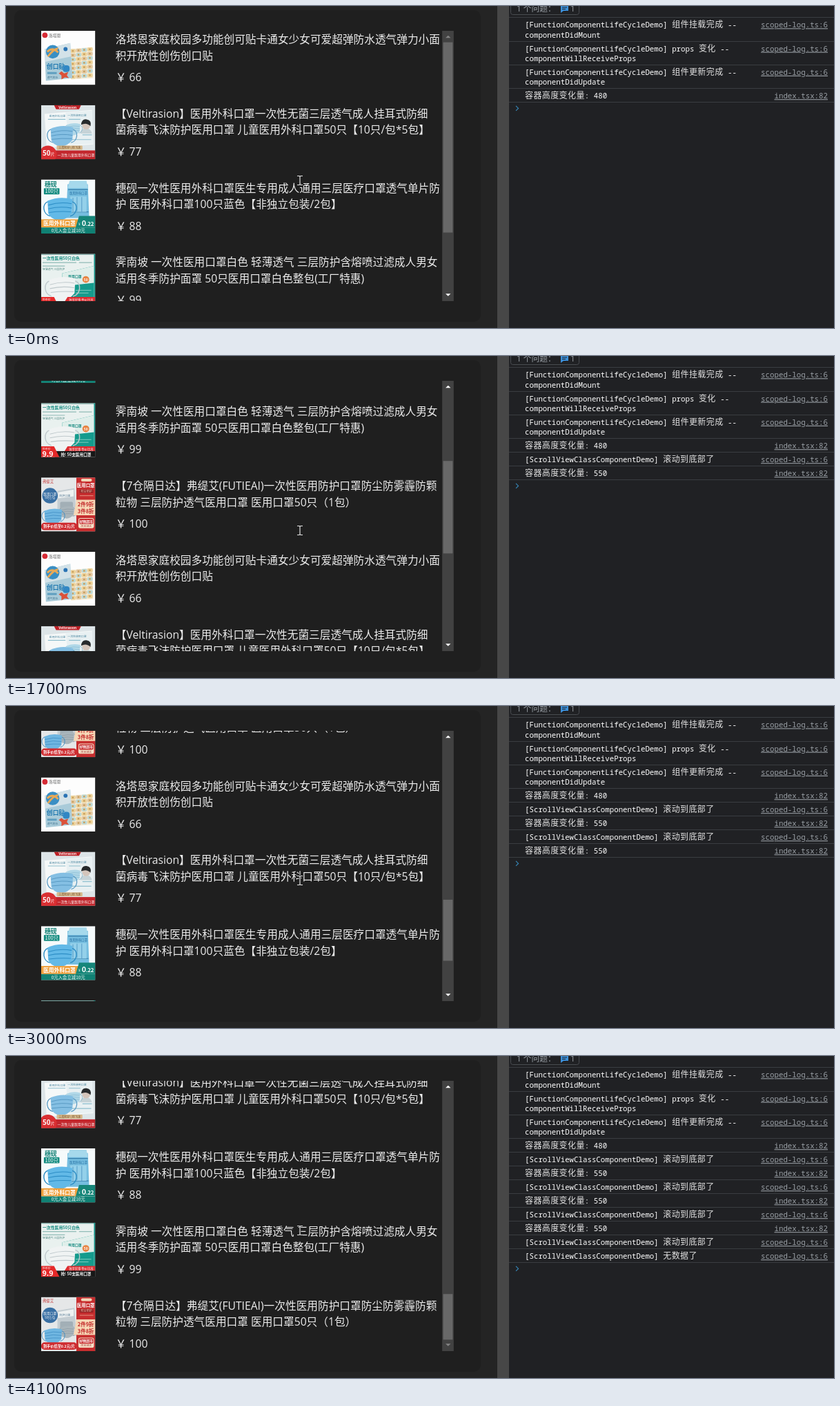
These frames come from a looping animation (1200x467 px, 6200 ms). An HTML page:

```html
<!DOCTYPE html>
<html lang="zh">
<head>
<meta charset="utf-8">
<title>Scroll view demo</title>
<style>
html, body { margin: 0; width: 100%; height: 100%; overflow: hidden; background: #242424; }
svg { display: block; width: 100%; height: 100%; }
text { white-space: pre; }
.list { font: 16px "Open Sans", "Noto Sans CJK SC", "Noto Sans CJK", sans-serif; fill: #ececec; }
.thumb { font-family: "Noto Sans CJK SC", "Noto Sans CJK", sans-serif; }
.log { font: 500 10.78px "Noto Sans Mono", "Noto Sans CJK SC", monospace; fill: #fff; }
.log .cjk { font: 400 12px "Noto Sans CJK SC", "Noto Sans CJK", sans-serif; letter-spacing: .4px; fill: #e3e3e3; }
.log .link { font-weight: 400; fill: #9aa0a6; text-decoration: underline; }
.bar { font: 11.76px "Open Sans", "Noto Sans CJK SC", sans-serif; fill: #9aa0a6; }
</style>
</head>
<body>
<svg id="stage" viewBox="0 0 1200 467" preserveAspectRatio="none"></svg>
<script>
const LOOP = 6200, SCALE = 0.98, VIEW = 400, PITCH = 110;

const rect = (x, y, w, h, fill, extra = '') =>
  `<rect x="${x}" y="${y}" width="${w}" height="${h}" fill="${fill}" ${extra}/>`;
const circle = (x, y, r, fill) => `<circle cx="${x}" cy="${y}" r="${r}" fill="${fill}"/>`;
const path = (d, fill, extra = '') => `<path d="${d}" fill="${fill}" ${extra}/>`;
const line = (d, stroke, w = 1) => path(d, 'none', `stroke="${stroke}" stroke-width="${w}"`);
const label = (x, y, size, fill, s, weight = 400, anchor = 'start') =>
  `<text x="${x}" y="${y}" font-size="${size}" fill="${fill}" font-weight="${weight}" text-anchor="${anchor}">${s}</text>`;

// Pleated face mask with ear loops, drawn in a 44 x 34 box.
const mask = (x, y, s, fill, shade) => `<g transform="translate(${x} ${y}) scale(${s})">
  ${line('M6 8C-3 10 -2 26 9 28M38 8C48 10 46 26 36 28', shade, 1.3)}
  ${path('M5 7Q22 0 39 5L38 24Q30 34 20 34Q9 32 6 24Z', fill)}
  ${line('M6 13Q22 8 38 11M6 18Q22 14 38 17M7 23Q22 21 37 22', shade, 1)}</g>`;

function plasterThumb() {
  let strips = '';
  for (let r = 0; r < 7; r++) for (let c = 0; c < 4; c++) {
    const x = 43 + c * 8.4, y = 27 + r * 6.4 - c * .8;
    strips += rect(x, y, 8, 5.6, ['#ecd29a', '#e3c9a4', '#bcd9d6'][(r + c) % 3], 'rx="2"') +
      rect(x + 2.5, y + 1.5, 2.5, 2.5, '#c99f5c');
  }
  return rect(0, 0, 80, 80, '#fdfdfd') +
    circle(5.5, 6.5, 4, '#d52b35') + label(11, 9, 6, '#666', '洛塔恩') +
    path('M42 27L76 24L77 70L44 72Z', '#f4ead3') + strips +
    path('M5 27L43 18L46 70L7 74Z', '#a9cbd9') + path('M5 27L43 18L44 38L6 46Z', '#d3e2e8') +
    circle(17, 31, 10, '#3a8fc4') + line('M9 31Q17 23 25 32M10 38Q18 27 25 26', '#e8a957', 3) +
    circle(36, 27, 3, '#2a73b4') + label(8, 56, 9, '#1f78b0', '创口贴', 700) +
    rect(32, 51, 10, 10, '#3187c4', 'rx="4"') +
    path('M30 60L34 63L40 61L38 66L41 70L35 69L30 72L30 66L26 63Z', '#db5139') +
    rect(9, 61, 14, 3, '#5f9fc0') + label(9, 70, 4, '#3c6f8c', '透气防水');
}

function kidsThumb() {
  return rect(0, 0, 80, 80, '#dde5e8') +
    path('M5 13L75 7L77 58L8 63Z', '#f5f8f8') + path('M36 11L75 8L77 57L42 59Z', '#e8f0f2') +
    path('M19 0H59L56 6H22Z', '#bd2026') + label(39, 4.8, 5, '#fff', 'Veltirasion', 600, 'middle') +
    label(12, 18, 4, '#4d87a0', '医用外科口罩') + label(39, 17, 4, '#4d87a0', '一次性使用口罩') +
    line('M10 21H36M41 21H58M44 51H74M61 44H75', '#8fbfce', 1.2) +
    path('M58 42Q58 35 66 34Q74 35 75 42Z', '#c6d3d7') + circle(66.5, 30, 6, '#d4c5bb') +
    path('M59 29Q60 20 67 21Q75 22 73 31Q67 25 59 29Z', '#272a2c') +
    mask(35, 25, .58, '#b1d8e8', '#7fb3cc') + mask(9, 28, .98, '#84bfe3', '#5698c2') +
    rect(23, 60, 38, 6, '#d6b98c', 'rx="1"') + label(42, 64.7, 4.2, '#6d4c2d', '三层防护 | 防飞沫', 400, 'middle') +
    rect(0, 67, 80, 13, '#c3272d') + circle(10, 73, 13, '#d92f32') +
    label(2, 75, 10, '#fff', '50', 700) + label(14, 75, 6, '#fff', '片') +
    label(24, 76, 5, '#fff', '一次性儿童医用外科口罩');
}

function packThumb() {
  return rect(0, 0, 80, 80, '#f5fafb') + label(5, 11, 9, '#138075', '穗砚', 700) +
    rect(4, 13, 23, 9, '#148c80', 'rx="1"') + label(15.5, 20.3, 7.5, '#fff', '100只', 500, 'middle') +
    path('M39 7H69L71 57H37Z', '#75bddf') + path('M42 2H67L69 13H39Z', '#a6d9ec') +
    line('M40 15H69M40 48H70', '#397faa', 1.2) + label(42, 22, 4.4, '#236ca0', '医用外科口罩') +
    rect(43, 25, 24, 23, '#94d0ea') + line('M47 27V47M53 26V47M60 26V48', '#559cc5', 1) +
    mask(4, 24, 1.08, '#62b9e7', '#2d8ec6') +
    rect(0, 59, 55, 12, '#efa03d') + label(3, 68, 8, '#fff', '医用外科口罩', 700) +
    path('M56 54H80V71H51Z', '#168679') + label(55, 67.5, 5, '#fff', '¥') +
    label(60, 68.5, 11, '#fff', '0', 700) + label(66, 68.5, 8, '#fff', '.22', 600) +
    rect(0, 71, 80, 9, '#108174') + label(40, 78, 6.5, '#fff', '0元入会立减10元', 500, 'middle');
}

function whiteThumb() {
  return rect(0, 0, 80, 80, '#e9f1ef') + rect(0, 0, 80, 1.5, '#7eaaa5') + rect(78, 0, 2, 72, '#15978b') +
    label(2, 9, 6, '#168b80', '一次性医用50只白色', 600) +
    line('M2 13H52M2 18H35M56 13H75', '#91bcb7', 1.2) + label(2, 24, 4, '#508a84', '轻薄透气 三层防护') +
    path('M31 29L78 18V66H30Z', '#159b8d') + path('M31 29L78 18V43L31 48Z', '#dfeeea') +
    label(40, 35, 5, '#178a80', '医用口罩', 600) + line('M51 54H74M51 58H70', '#83cec2', 1) +
    circle(66, 38, 5, '#e88342') + label(66, 40, 5, '#fff', '50', 600, 'middle') +
    mask(6, 31, 1.14, '#f0f3f3', '#bfc9cc') +
    path('M39 64H80V72H34Z', '#dc2b2f') + label(41, 70, 4.4, '#fff', '独享优惠 性价比高') +
    rect(20, 71, 60, 9, '#171717') + path('M0 64H19L27 80H0Z', '#e52828') +
    label(2, 69, 4, '#fff', '秒杀价') + label(1.5, 79, 11, '#fff', '9.9', 700) +
    label(29, 78, 5.8, '#fff', '抢! 50支医用口罩', 700);
}

function dustThumb() {
  return rect(0, 0, 80, 80, '#e5e7e8') + rect(52, 0, 28, 80, '#c72e2f') +
    label(2, 8, 5.5, '#c54040', '弗缇艾', 500) + rect(59, 2, 16, 4, '#f0d7ba', 'rx="2"') +
    label(66, 14.5, 6.6, '#fff', '医用口罩', 700, 'middle') +
    rect(57, 18, 20, 5, '#942022') + label(67, 22, 4.2, '#f2d9c0', '防尘防护', 400, 'middle') +
    line('M57 27H77', '#e49482', 1) +
    path('M24 20L49 16L52 57L24 60Z', '#c4cdd2') + path('M25 22L48 18V28L25 31Z', '#eef1f1') +
    rect(28, 36, 19, 16, '#a2afb6', 'rx="2"') + label(27, 28, 4, '#557a94', '防护口罩') +
    circle(13, 27, 11.5, '#396fa3') + label(13, 26, 4.8, '#fff', '医用口罩', 500, 'middle') +
    label(13, 32, 4.4, '#fff', '50只/包', 400, 'middle') +
    mask(26, 41, .58, '#a9b5bb', '#85949c') + mask(1, 44, .76, '#6fb6e1', '#3d8cc2') +
    path('M52 33H80V56H48Z', '#f6d7b6') + label(66, 43, 7.6, '#c22426', '2件9折', 700, 'middle') +
    label(66, 53, 7.6, '#c22426', '3件8折', 700, 'middle') +
    rect(55, 60, 23, 15, '#f5dfc6', 'rx="3"') + rect(56, 61, 21, 8, '#c72a2c', 'rx="2"') +
    label(66.5, 67, 5, '#fff', '好物超市', 600, 'middle') + label(66.5, 73.3, 4, '#a63030', '次日送达', 400, 'middle') +
    rect(0, 67, 53, 11, '#cf2c30', 'rx="5"') + label(26.5, 74.6, 5.3, '#fff', '到手价低至0.2元/片', 600, 'middle');
}

const products = [
  [plasterThumb, '洛塔恩家庭校园多功能创可贴卡通女少女可爱超弹防水透气弹力小面', '积开放性创伤创口贴', 66],
  [kidsThumb, '【Veltirasion】医用外科口罩一次性无菌三层透气成人挂耳式防细', '菌病毒飞沫防护医用口罩 儿童医用外科口罩50只【10只/包*5包】', 77],
  [packThumb, '穗砚一次性医用外科口罩医生专用成人通用三层医疗口罩透气单片防', '护 医用外科口罩100只蓝色【非独立包装/2包】', 88],
  [whiteThumb, '霁南坡 一次性医用口罩白色 轻薄透气 三层防护含熔喷过滤成人男女', '适用冬季防护面罩 50只医用口罩白色整包(工厂特惠)', 99],
  [dustThumb, '【7仓隔日达】弗缇艾(FUTIEAI)一次性医用防护口罩防尘防雾霾防颗', '粒物 三层防护透气医用口罩 医用口罩50只（1包）', 100],
];

const item = i => {
  const [, first, second, price] = products[i % 5];
  return `<g transform="translate(0 ${i * PITCH})"><use href="#thumb${i % 5}"/>
    <text x="110" y="18.4">${first}</text><text x="110" y="42.4">${second}</text>
    <text x="110" y="74.5">￥ ${price}</text></g>`;
};

// Console entries: [time, message, link, optional second line]
const hook = '[FunctionComponentLifeCycleDemo]', view = '[ScrollViewClassComponentDemo]';
const scoped = 'scoped-log.ts:6', index = 'index.tsx:82';
const reached = t => [t, view + ' 滚动到底部了', scoped];
const grown = (t, n) => [t, '容器高度变化量: ' + n, index];
const entries = [
  [0, hook + ' 组件挂载完成 --', scoped, 'componentDidMount'],
  [0, hook + ' props 变化 --', scoped, 'componentWillReceiveProps'],
  [0, hook + ' 组件更新完成 --', scoped, 'componentDidUpdate'],
  grown(0, 480),
  reached(1200), grown(1300, 550),
  reached(2400), grown(2500, 550),
  reached(3400), grown(3500, 550),
  reached(4100), [4100, view + ' 无数据了', scoped],
];

const markup = s => s.replace(/[\u4e00-\u9fff]+/g, '<tspan class="cjk">$&</tspan>');

let rowTop = 16.8;
const rowEnds = [];
const rows = entries.map(([, message, link, more]) => {
  const y = rowTop + 14.5;
  rowTop += more ? 34.3 : 20;
  rowEnds.push(rowTop);
  return `<g class="row"><text x="752" y="${y}">${markup(message)}</text>
    ${more ? `<text x="752" y="${y + 14.2}">${more}</text>` : ''}
    <text class="link" x="1191" y="${y}" text-anchor="end">${link}</text>
    ${rect(729, Math.floor(rowTop), 471, 1, '#3a3d41')}</g>`;
}).join('');

const beam = 'M422 246.5H425L426 247.5L427 246.5H430M426 247V259M422 259.5H425L426 258.5L427 259.5H430';

document.getElementById('stage').innerHTML = `
  <defs>
    <clipPath id="view">${rect(0, 0, 593, VIEW, '#000')}</clipPath>
    <clipPath id="square">${rect(0, 0, 80, 80, '#000')}</clipPath>
    ${products.map(([draw], i) => `<g id="thumb${i}" class="thumb" clip-path="url(#square)">${draw()}</g>`).join('')}
  </defs>
  ${rect(0, 0, 1200, 467, '#242424')}
  ${rect(12, 6, 676, 452, '#1f1f1f', 'rx="10"')}
  <g transform="translate(51 36) scale(${SCALE})">
    <g class="list" clip-path="url(#view)"><g id="items">${Array.from({length: 20}, (_, i) => item(i)).join('')}</g></g>
    ${rect(593, 0, 17, VIEW, '#424242')}
    <rect id="handle" x="594.5" width="14" fill="#686868"/>
    <path id="up" d="M598 10.5L601.8 6.8L605.6 10.5Z"/>
    <path id="down" d="M598 389L601.8 392.7L605.6 389Z"/>
  </g>
  ${rect(712, 0, 17, 467, '#474747')}
  ${rect(729, 0, 471, 467, '#202124')}
  ${rect(731.5, -8, 99, 20.5, 'none', 'rx="3" stroke="#4a4d51"')}
  <g class="bar"><text x="740" y="7.5">1 个问题：</text><text x="818" y="7.5">1</text></g>
  ${path('M804 -1H815V7H808L804 10Z', '#3c8fd9')}
  ${line('M806 2H813M806 4.5H811', '#202124')}
  ${rect(729, 16, 471, 1, '#3a3d41')}
  <g class="log">${rows}</g>
  <path id="prompt" d="M739 -3.5L742.5 0L739 3.5" fill="none" stroke="#3687b8" stroke-width="1.2"/>
  ${line(beam, '#222', 3)}${line(beam, '#ddd', 1.2)}`;

// Each wheel burst: start time, then the scroll offset at every 100 ms step.
const bursts = [
  [0, 0],
  [900, 20, 100],
  [1200, 120, 120],
  [1600, 190, 297, 390, 470, 550, 610, 640],
  [2400, 670, 735, 840, 900, 945, 990, 1031],
  [3100, 1040],
  [3300, 1130, 1220, 1300, 1418, 1545, 1680, 1770],
];
const loads = [1300, 2500, 3500];

function scrollAt(t) {
  const [start, ...steps] = bursts.filter(b => b[0] <= t).pop();
  return steps[Math.min(Math.floor((t - start) / 100), steps.length - 1)];
}

const $ = id => document.getElementById(id);
const rowNodes = document.querySelectorAll('.row');

function render(t) {
  const scroll = scrollAt(t);
  const height = 520 + 550 * loads.filter(at => at <= t).length;
  const track = VIEW - 34;
  $('items').setAttribute('transform', `translate(0 ${-scroll})`);
  $('handle').setAttribute('y', 17 + track * scroll / height);
  $('handle').setAttribute('height', track * VIEW / height);
  $('up').setAttribute('fill', scroll > 0 ? '#fff' : '#858585');
  $('down').setAttribute('fill', scroll < height - VIEW ? '#fff' : '#858585');

  const shown = entries.filter(e => e[0] <= t).length;
  rowNodes.forEach((row, i) => row.setAttribute('visibility', i < shown ? 'visible' : 'hidden'));
  $('prompt').setAttribute('transform', `translate(0 ${rowEnds[shown - 1] + 8.7})`);
}

const began = performance.now();
function tick() {
  render((performance.now() - began) % LOOP);
  requestAnimationFrame(tick);
}
tick();
</script>
</body>
</html>
```
